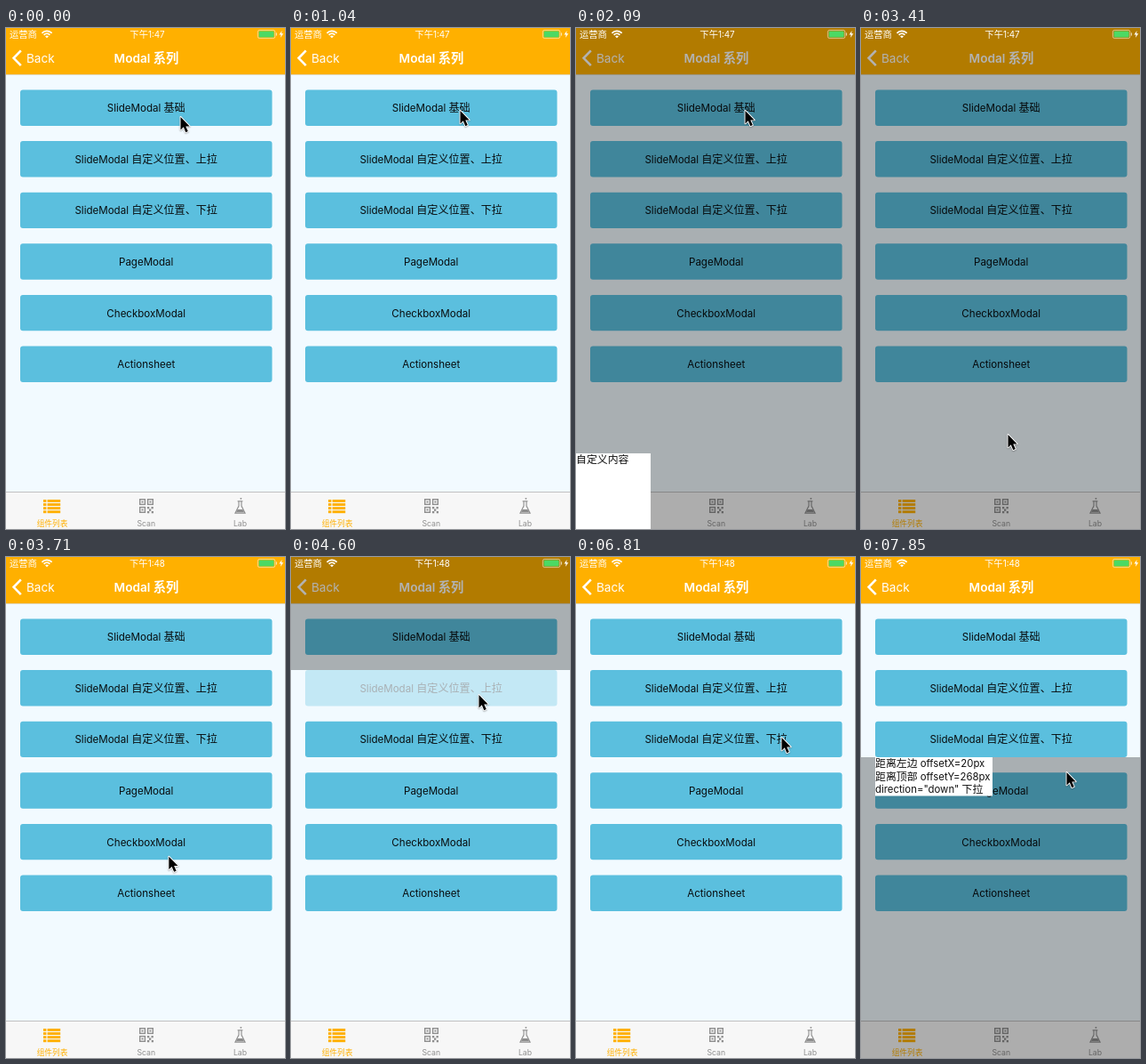
Recreate the animation shown at these times as an HTML page with a canvas. Size 314 by 563 pixels, loop 8 s.

```html
<!DOCTYPE html>
<html lang="zh">
<head>
<meta charset="utf-8">
<title>Modal</title>
<style>
html, body { margin: 0; width: 100%; height: 100%; overflow: hidden; background: #f2faff; }
canvas { display: block; width: 314px; height: 563px; }
</style>
</head>
<body>
<canvas id="stage"></canvas>
<script>
const W = 314, H = 563, LOOP = 8000, STEPS = 54;
const AMBER = '#ffb000', GREY = '#8e8e8e';
const canvas = document.getElementById('stage');
const ratio = Math.max(1, window.devicePixelRatio || 1);
canvas.width = W * ratio;
canvas.height = H * ratio;
const c = canvas.getContext('2d');
c.scale(ratio, ratio);

const buttons = ['SlideModal 基础', 'SlideModal 自定义位置、上拉', 'SlideModal 自定义位置、下拉',
  'PageModal', 'CheckboxModal', 'Actionsheet'];

// dim: top and bottom of the overlay; dir: -1 slides up, 1 slides down
const modals = [
  { button: 0, open: 11, shut: 22, dim: [0, H], dir: -1, x: 0, w: 84, h: 85, lines: ['自定义内容'] },
  { button: 1, open: 31, shut: 42, dim: [0, 127], dir: -1, x: 16, w: 131, h: 43,
    lines: ['距离左边 offsetX=20px', '距离顶部 offsetY=151px', 'direction="up" 上拉'] },
  { button: 2, open: 51, shut: 99, dim: [225, H], dir: 1, x: 16, w: 132, h: 43.5,
    lines: ['距离左边 offsetX=20px', '距离顶部 offsetY=268px', 'direction="down" 下拉'] }
];

// step, x, y of the pointer tip
const path = [
  [3, 196.5, 100], [4, 215, 98], [5, 208, 95], [7, 190.5, 93],
  [15, 190.5, 93], [16, 187, 150], [18, 166, 400], [19, 161.5, 483], [20, 165.5, 457],
  [23, 165.5, 457], [24, 172, 410], [27, 206, 190], [29, 211.5, 155],
  [35, 211.5, 155], [38, 215.5, 114],
  [42, 215.5, 114], [46, 231.5, 203], [51, 231.5, 203], [53, 231.5, 242]
];

function box(x, y, w, h, color) {
  c.fillStyle = color;
  c.fillRect(x, y, w, h);
}

function poly(points, close) {
  c.beginPath();
  points.forEach(([x, y]) => c.lineTo(x, y));
  if (close) c.closePath();
}

function roundBox(x, y, w, h, r) {
  c.beginPath();
  c.roundRect(x, y, w, h, r);
}

// Chinese and Latin runs use slightly different sizes; anchor 0 = left, .5 = centre
function label(text, x, y, size, color, anchor = 0.5, weight = 400) {
  const runs = text.match(/[\u3000-\u9fff]+|[^\u3000-\u9fff]+/g).map(run => {
    const font = /[\u3000-\u9fff]/.test(run)
      ? `${weight} ${size}px "Noto Sans CJK SC", "Noto Sans CJK", sans-serif`
      : `${weight} ${size * 0.955}px Inter, sans-serif`;
    c.font = font;
    return { run, font, w: c.measureText(run).width };
  });
  x -= anchor * runs.reduce((sum, r) => sum + r.w, 0);
  c.fillStyle = color;
  for (const r of runs) {
    c.font = r.font;
    c.fillText(r.run, x, y + size * 0.36);
    x += r.w;
  }
}

function drawHeader() {
  box(0, 0, W, 52, AMBER);
  box(0, 52, W, 0.7, '#d9c79a');
  c.strokeStyle = '#fff';
  c.lineWidth = 2.6;
  poly([[16.8, 25.4], [8.6, 33.8], [16.8, 42.2]]);
  c.stroke();
  label('Back', 23, 34, 14.2, '#fff', 0);
  label('Modal 系列', 158, 34, 14.3, '#fff', 0.5, 600);
}

function drawButton(text, i, alpha) {
  const y = 69.5 + 57.6 * i;
  // flat blends stand in for group opacity
  const mix = (a, b) => Math.round(a * alpha + b * (1 - alpha));
  c.fillStyle = `rgb(${mix(91, 242)},${mix(191, 250)},${mix(222, 255)})`;
  roundBox(16, y, 283.5, 40.4, 3);
  c.fill();
  label(text, 157.7, y + 20.4, 12.1, `rgb(${mix(8, 242)},${mix(12, 250)},${mix(14, 255)})`);
}

function drawTabs() {
  box(0, 521, W, 42, '#f7f7f7');
  box(0, 521, W, 0.8, '#b4b4b4');

  for (let i = 0; i < 4; i++) {
    const y = 530 + i * 4.1;
    box(42, y, 3.4, 2.9, AMBER);
    box(46.6, y, 14.6, 2.9, AMBER);
  }
  label('组件列表', 52, 557, 8.7, AMBER);

  c.strokeStyle = GREY;
  c.lineWidth = 1.4;
  for (const [x, y] of [[150.7, 529.7], [159.6, 529.7], [150.7, 538.6]]) {
    c.strokeRect(x, y, 5.7, 5.7);
    box(x + 1.9, y + 1.9, 1.9, 1.9, GREY);
  }
  for (const [x, y] of [[159, 538], [163.5, 538], [161, 540.5], [159, 543], [163.7, 543]])
    box(x, y, 2.3, 2.3, GREY);
  label('Scan', 157.7, 557, 9.1, GREY);

  c.lineWidth = 1.1;
  poly([[262, 532], [262, 537], [257.9, 545.3], [269.1, 545.3], [265, 537], [265, 532]]);
  c.stroke();
  poly([[260.6, 531.8], [266.4, 531.8]]);
  c.stroke();
  c.fillStyle = GREY;
  poly([[260.6, 541], [266.4, 541], [268.2, 544.5], [258.8, 544.5]], true);
  c.fill();
  box(263.6, 528, 1.6, 1.6, GREY);
  label('Lab', 263.5, 557, 9.1, GREY);
}

function drawStatus(step) {
  label('运营商', 4, 7, 10.3, '#fff', 0);
  c.strokeStyle = '#fff';
  c.lineWidth = 1.7;
  for (const r of [4.6, 7.6]) {
    c.beginPath();
    c.arc(46, 11, r, -Math.PI * 0.76, -Math.PI * 0.24);
    c.stroke();
  }
  c.fillStyle = '#fff';
  c.beginPath();
  c.moveTo(46, 11.2);
  c.arc(46, 11.2, 2.6, -Math.PI * 0.76, -Math.PI * 0.24);
  c.fill();
  label(step < 25 ? '下午1:47' : '下午1:48', 159, 7, 10.3, '#fff');

  c.strokeStyle = 'rgba(255,255,255,.65)';
  c.lineWidth = 0.8;
  roundBox(283.4, 2.4, 19.4, 9.2, 2);
  c.stroke();
  c.fillStyle = '#4cd964';
  roundBox(284.6, 3.6, 17, 6.8, 1.2);
  c.fill();
  box(303.8, 5.4, 1.2, 3.2, 'rgba(255,255,255,.65)');
  c.fillStyle = '#fff';
  poly([[310.6, 3], [307.4, 7.6], [309.6, 7.6], [308.8, 11], [312.2, 6.3], [310, 6.3]], true);
  c.fill();
}

function drawModal(m, step) {
  const [top, bottom] = m.dim;
  box(0, top, W, bottom - top, 'rgba(0,0,0,.3)');
  const shown = step < m.shut ? [0, 0.65][step - m.open] ?? 1 : step === m.shut ? 0.23 : 0;
  if (!shown) return;
  const y = m.dir < 0 ? bottom - m.h * shown : top - m.h * (1 - shown);
  c.save();
  c.beginPath();
  c.rect(0, top, W, bottom - top);
  c.clip();
  c.globalAlpha = shown;
  box(m.x, y, m.w, m.h, '#fff');
  m.lines.forEach((line, i) => label(line, m.x, y + 7.2 + i * 14.4, 11.9, '#111', 0));
  c.restore();
}

function drawPointer(step) {
  let i = path.findIndex(p => p[0] >= step);
  if (i < 1) i = 1;
  const [s0, x0, y0] = path[i - 1], [s1, x1, y1] = path[i];
  const k = Math.max(0, (step - s0) / (s1 - s0));
  c.save();
  c.translate(x0 + (x1 - x0) * k, y0 + (y1 - y0) * k);
  poly([[0, 0], [0, 14.4], [3.3, 11.3], [5.8, 17.2], [8.3, 16.1], [5.8, 10.4], [10.2, 10.4]], true);
  c.lineJoin = 'round';
  c.lineWidth = 1.9;
  c.strokeStyle = '#fff';
  c.shadowColor = 'rgba(0,0,0,.35)';
  c.shadowBlur = 1.5 * ratio;
  c.shadowOffsetY = 0.7 * ratio;
  c.stroke();
  c.shadowColor = 'transparent';
  c.fillStyle = '#000';
  c.fill();
  c.restore();
}

function draw(time) {
  const step = Math.min(STEPS - 1, Math.floor((time % LOOP + 8) * STEPS / LOOP));
  const modal = modals.find(m => step >= m.open && step < m.shut + 2);

  box(0, 0, W, H, '#f2faff');
  drawHeader();
  buttons.forEach((text, i) => {
    const pressed = modal && modal.button === i;
    drawButton(text, i, pressed ? [0.31, 0.65][step - modal.open] ?? 1 : 1);
  });
  drawTabs();
  if (modal) drawModal(modal, step);
  drawStatus(step);
  drawPointer(step);
}

const start = performance.now();
function tick() {
  draw(performance.now() - start);
  requestAnimationFrame(tick);
}
tick();
</script>
</body>
</html>
```
